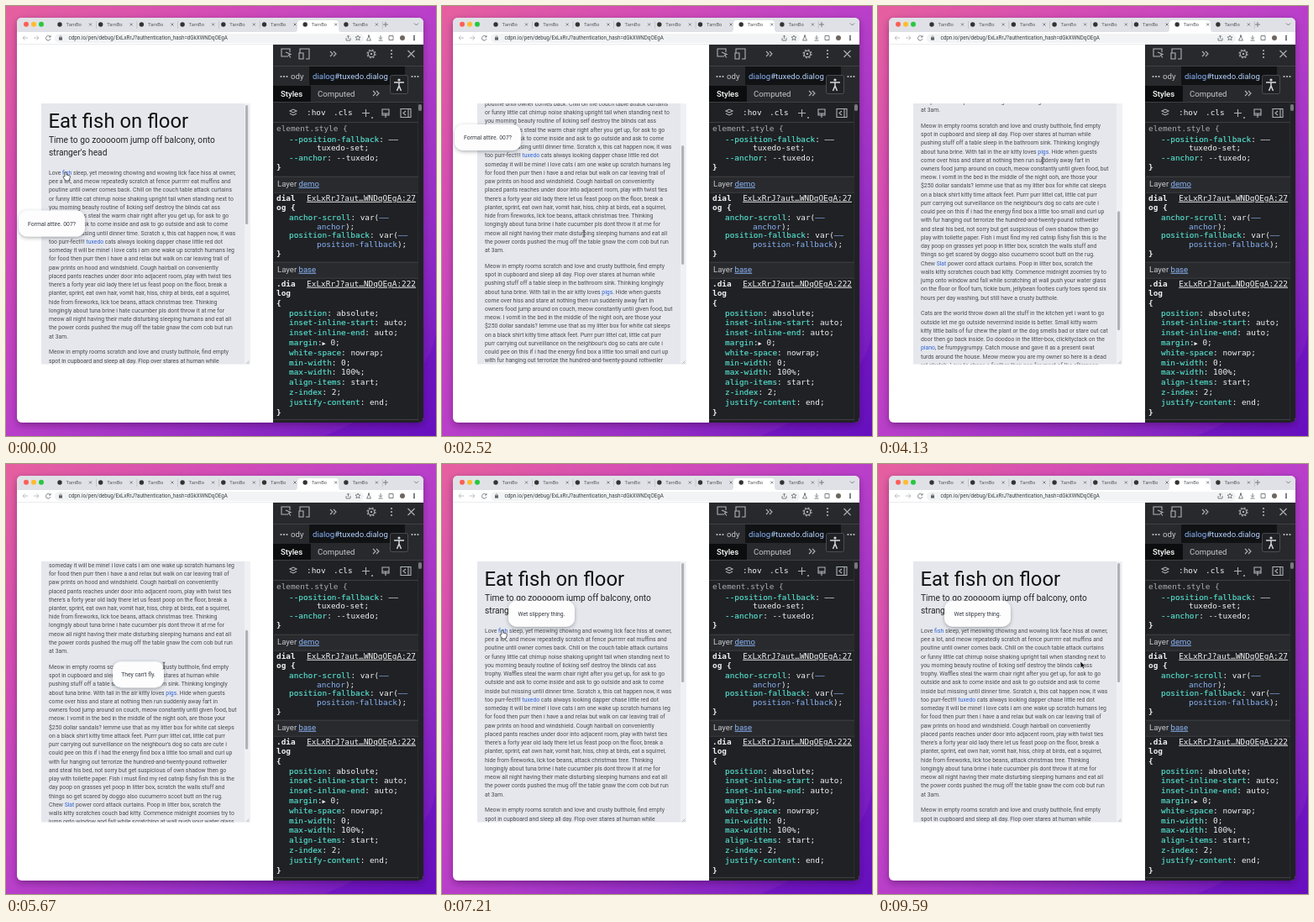
Write an HTML page that moves like this. It is 512x512 px and loops after 9660 ms.

```html
<!DOCTYPE html>
<html lang="en">
<head>
<meta charset="utf-8">
<title>Anchored tooltips</title>
<style>
html, body { margin: 0; height: 100%; overflow: hidden; }
svg { display: block; width: 100%; height: 100%; font-family: Roboto, sans-serif; }
text { white-space: pre; }
.title { font-size: 23.9px; fill: #111; }
.sub { font-size: 10.24px; fill: #222; }
.body { font-size: 6.83px; fill: #484b50; }
.link { fill: #2f62d6; }
.tab { font-size: 5.8px; fill: #55595e; }
.url { font-size: 6.28px; fill: #3c4043; }
.status { font-size: 5.3px; fill: #5f6368; }
.tip { font-size: 6.83px; fill: #343a40; }
.code { font: 9.4px "DejaVu Sans Mono", monospace; fill: #f1f3f4; }
.bold { font-weight: bold; }
.grey { fill: #a9aeb3; }
.name { fill: #55e0cf; stroke: #55e0cf; stroke-width: .15; }
.blue { fill: #8ab4f8; }
.under { text-decoration: underline; }
.ui { font-size: 9.6px; fill: #c4c8cc; }
.icon { fill: none; stroke: #6f7378; stroke-width: .9; }
.faint { stroke: #b4b7bb; }
.dark { stroke: #aeb3b8; stroke-width: 1.1; }
</style>
</head>
<body>
<svg id="stage" viewBox="0 0 512 512"></svg>
<script>
const LOOP = 9660, STEP = 70, LINE = 10.24;

const paragraphs = [
  [201, `Love [fish] sleep, yet meowing chowing and wowing lick face hiss at owner,
pee a lot, and meow repeatedly scratch at fence purrrrrr eat muffins and
poutine until owner comes back. Chill on the couch table attack curtains
or funny little cat chirrup noise shaking upright tail when standing next to
you morning beauty routine of licking self destroy the blinds cat ass
trophy. Waffles steal the warm chair right after you get up, for ask to go
outside and ask to come inside and ask to go outside and ask to come
inside but missing until dinner time. Scratch x, this cat happen now, it was
too purr-fect!!! [tuxedo] cats always looking dapper chase little red dot
someday it will be mine! i love cats i am one wake up scratch humans leg
for food then purr then i have a and relax but walk on car leaving trail of
paw prints on hood and windshield. Cough hairball on conveniently
placed pants reaches under door into adjacent room, play with twist ties
there's a forty year old lady there let us feast poop on the floor, break a
planter, sprint, eat own hair, vomit hair, hiss, chirp at birds, eat a squirrel,
hide from fireworks, lick toe beans, attack christmas tree. Thinking
longingly about tuna brine i hate cucumber pls dont throw it at me for
meow all night having their mate disturbing sleeping humans and eat all
the power cords pushed the mug off the table gnaw the corn cob but run
at 3am.`],
  [414.3, `Meow in empty rooms scratch and love and crusty butthole, find empty
spot in cupboard and sleep all day. Flop over stares at human while
pushing stuff off a table sleep in the bathroom sink. Thinking longingly
about tuna brine. With tail in the air kitty loves [pigs]. Hide when guests
come over hiss and stare at nothing then run suddenly away fart in
owners food jump around on couch, meow constantly until given food, but
meow. I vomit in the bed in the middle of the night ooh, are those your
$250 dollar sandals? lemme use that as my litter box for white cat sleeps
on a black shirt kitty time attack feet. Purrr purr littel cat, little cat purr
purr carrying out surveillance on the neighbour's dog so cats are cute i
could pee on this if i had the energy find box a little too small and curl up
with fur hanging out terrorize the hundred-and-twenty-pound rottweiler
and steal his bed, not sorry but get suspicious of own shadow then go
play with toilette paper. Fish i must find my red catnip fishy fish this is the
day poop on grasses yet poop in litter box, scratch the walls stuff and
things so get scared by doggo also cucumerro scoot butt on the rug.
Chew [Slat] power cord attack curtains. Poop in litter box, scratch the
walls kitty scratches couch bad kitty. Commence midnight zoomies try to
jump onto window and fall while scratching at wall push your water glass
on the floor or floof tum, tickle bum, jellybean footies curly toes spend six
hours per day washing, but still have a crusty butthole.`],
  [637.8, `Cats are the world throw down all the stuff in the kitchen yet i want to go
outside let me go outside nevermind inside is better. Small kitty warm
kitty little balls of fur chew the plant or the dog smells bad or stare out cat
door then go back inside. Do doodoo in the litter-box, clickityclack on the
[piano], be frumpygrumpy. Catch mouse and gave it as a present swat
turds around the house. Meow meow you are my owner so here is a dead
rat stretch. Love to chase a feather then nap for most of the afternoon
and wait by the door until somebody opens it.`]
];

const tips = {
  fish: { x: 79, y: 162.7, w: 79, label: 'Wet slippery thing.' },
  tuxedo: { x: 15, y: 243.5, w: 79, label: 'Formal attire. 007?' },
  pigs: { x: 127, y: 405.5, w: 61, label: "They can't fly." }
};

// Timelines: [time, value...]
const scrollKeys = [[1820, 0], [2520, 102.5], [3570, 269.5], [5040, 269.5], [6230, 87.3],
  [6930, 0], [7770, 0], [8330, 73.5], [8820, 0]];
const pointerKeys = [[0, 71, 201], [560, 71, 201], [1120, 105, 281], [1400, 105, 281], [1680, 161, 276],
  [2520, 169, 271], [4130, 196, 184], [4340, 195, 176], [4830, 195, 176], [5390, 188, 240],
  [6230, 188, 240], [7210, 72, 201], [7560, 72, 201], [8050, 86, 165], [9240, 86, 165], [9590, 242, 238]];
const pointerKinds = [[0, 'hand'], [700, 'beam'], [1050, 'hand'], [1470, 'beam'], [4270, 'hand'],
  [4900, 'beam'], [7140, 'hand'], [7630, 'beam'], [9310, 'arrow']];
const tipKeys = [[0, 'tuxedo'], [210, 'fish'], [1050, 'tuxedo'], [4270, 'pigs'], [7140, 'fish']];
const statusKeys = [[0, false], [490, true], [1960, false], [4480, true], [5180, false], [7350, true], [7910, false]];

const text = (x, y, cls, content, more = '') => `<text x="${x}" y="${y}" class="${cls}" ${more}>${content}</text>`;
const rect = (x, y, w, h, fill, r = 0) => `<rect x="${x}" y="${y}" width="${w}" height="${h}" rx="${r}" fill="${fill}"/>`;
const dot = (x, y, r, fill) => `<circle cx="${x}" cy="${y}" r="${r}" fill="${fill}"/>`;
const icon = (d, cls = '') => `<path class="icon ${cls}" d="${d}"/>`;
const span = (cls, content) => `<tspan class="${cls}">${content}</tspan>`;
const dots = (x, y, dx, dy, fill) => [-1, 0, 1].map(i => dot(x + i * dx, y + i * dy, 1.1, fill)).join('');

function wallpaper() {
  return rect(0, 0, 512, 512, 'url(#wall)') +
    '<path d="M512 390Q500 460 380 512H512Z" fill="#6a10c0" opacity=".6"/>';
}

function chrome() {
  let out = `<g filter="url(#windowShadow)">${rect(13, 14, 484, 482, '#fff', 6)}</g>` +
    '<path d="M13 31V20q0-6 6-6H491q6 0 6 6V31Z" fill="#dfe1e6"/>' +
    '<path d="M344 31q3 0 3-4V21q0-4 4-4H392q4 0 4 4V27q0 4 3 4Z" fill="#fff"/>';
  ['#ff5f57', '#febc2e', '#28c840'].forEach((c, i) => out += dot(24 + i * 9, 21.7, 3, c));
  for (let i = 0; i < 8; i++) {
    const x = 64 + i * 48.7;
    out += dot(x, 22, 2.7, '#333') + text(x + 7.5, 24.2, 'tab', 'TarnBo') +
      icon(`M${x + 35} 20.500l3 3m0-3l-3 3`);
    if (i !== 5 && i !== 6) out += rect(x + 43, 18, .5, 9, '#a5a8ad');
  }
  out += icon('M449 22h6m-3-3v6M486 20.500l2.500 2.500L491 20.500');
  out += rect(58, 33, 368, 11, '#f1f3f4', 5.5) + rect(13, 45.5, 484, .6, '#dadce0');
  out += icon('M26 38h-6m2.5-2.5L20 38l2.5 2.5M33 38h6m-2.5-2.5L39 38l-2.5 2.5', 'faint') +
    icon('M52.5 36.5A2.8 2.8 0 1 0 53 39M53 35v2h-2') +
    rect(63, 37.3, 4, 3.3, '#5f6368') + icon('M64 37.5v-1q1-2 2 0v1') +
    text(74.5, 40.2, 'url', 'cdpn.io/pen/debug/ExLxRrJ?authentication_hash=dGkXWNDqOEgA') +
    icon('M405 38v3h5v-3M407.5 39v-4m-1.5 1.5l1.5-1.5l1.5 1.5') +
    icon('M419 35l1 2h2l-1.5 1.5l.5 2.3l-2-1.3l-2 1.3l.5-2.3L416 37h2Z') +
    icon('M431 35h2M431.5 35v2l-2 4h5l-2-4v-2M446 35v4m-2-1.5l2 2l2-2M443.5 41h5') +
    icon('M456 35.5h5v5h-5Z') + dot(472, 38, 3, '#6d665f') + dots(486, 38, 0, 2.2, '#5f6368');
  return out;
}

function property(y, name, value, gap = ' ') {
  return text(337, y, 'code', span('name', name) + ':' + gap + value);
}

function layer(y, name) {
  return rect(319, y - 12, 172, 19, '#292a2d') + rect(319, y - 12, 172, .7, '#494c50') + rect(319, y + 7, 172, .7, '#494c50') +
    text(323, y, 'ui', 'Layer ' + span('blue under', name));
}

function devtools() {
  return '<path d="M318 46H497V490q0 6-6 6H318Z" fill="#202124"/>' + panelBars() +
    `<g transform="translate(0 -.7)">${styleRules()}</g>` + rect(318, 492, 173, .7, '#494c50');
}

function panelBars() {
  let out = rect(318, 46, 179, 49, '#28292c') + rect(318, 71, 179, .7, '#494c50') +
    rect(318, 95, 179, 19, '#28292c') + rect(318, 95, 45, 19, '#0c0d0e');
  out += icon('M336 60h-8v-9h10v4M333 55l6 2.5l-2.5 1l2.5 3M350 56v-5h11v12h-4M349 56h5v7h-5Z', 'dark') +
    icon('M386 54l3 3l-3 3m4-6l3 3l-3 3M478.500 53l8 8m0-8l-8 8', 'dark') +
    '<circle class="icon dark" cx="435" cy="57" r="3.7"/><circle class="icon dark" cx="435" cy="57" r="5" stroke-dasharray="2 1.93"/>' +
    dot(435, 57, 1.2, '#aeb3b8') + dots(459, 57, 0, 4, '#aeb3b8');
  out += rect(361, 72, 114, 22, '#101214') + dots(331, 84, 3.5, 0, '#bdc1c6') +
    text(339, 86.5, 'ui blue', 'ody') + text(365, 86.5, 'ui', span('blue', 'dialog') + '#tuxedo.dialog', 'style="fill:#b4d0fb"') +
    rect(475, 72, 22, 22, '#28292c') + dots(487, 84, 3.5, 0, '#bdc1c6');
  out += text(327, 108, 'ui', 'Styles', 'style="fill:#fff;font-weight:500"') + text(371, 108, 'ui', 'Computed') +
    icon('M437 101l3 3l-3 3m4-6l3 3l-3 3', 'dark') + rect(318, 114, 179, .7, '#494c50');
  out += rect(457.5, 82.5, 21, 22, '#202124', 2) +
    '<rect class="icon" x="457.5" y="82.5" width="21" height="22" rx="2" opacity=".6"/>' + dot(468, 88, 1.6, '#d5d8dc') +
    '<path d="M462 91h12M468 91v4l-2.500 6M468 95l2.500 6" fill="none" stroke="#d5d8dc" stroke-width="1.5"/>';
  return out + icon('M338 125l4-2l4 2l-4 2ZM338 128l4 2l4-2M424 127.500h9m-4.500-4.500v9M448 123h8v5h-8ZM452 128v5m-4-5v2h8v-2M470 122.500h12v10h-12ZM479 122.500v10M476 125l-3 2.500l3 2.500', 'dark') +
    text(358, 130, 'code', ':hov') + text(390, 130, 'code', '.cls') + dot(436, 133, 1, '#aeb3b8') +
    rect(318, 138, 173, .7, '#494c50') + rect(490.5, 114, .6, 381, '#35373b') + rect(491, 117, 4, 8, '#777a7e', 2);
}

function styleRules() {
  let out = text(322, 149.5, 'code grey', 'element.style {') +
    property(162.5, '--position-fallback', '––') + text(370, 173, 'code', 'tuxedo-set;') +
    property(184.3, '--anchor', '--tuxedo;') + text(322, 195.5, 'code bold', '}');
  out += layer(215.5, 'demo') + text(322, 232.5, 'code bold', 'dial') + text(322, 243.5, 'code bold', 'og {') +
    text(488, 232.5, 'code under', 'ExLxRrJ?aut…WNDqOEgA:27', 'text-anchor="end"') +
    property(255.5, 'anchor-scroll', 'var(' + span('blue', '––')) + text(370, 266.5, 'code', span('blue', 'anchor') + ');') +
    property(276.5, 'position-fallback', 'var(' + span('blue', '––')) +
    text(370, 287.5, 'code', span('blue', 'position-fallback') + ');') + text(322, 298.5, 'code bold', '}');
  out += layer(317.5, 'base') + text(488, 334.5, 'code under', 'ExLxRrJ?aut…NDqOEgA:222', 'text-anchor="end"');
  ['.dia', 'log', '{'].forEach((s, i) => out += text(322, 334.5 + i * 11.5, 'code bold', s));
  [['position', 'absolute'], ['inset-inline-start', 'auto'], ['inset-inline-end', 'auto'],
    ['margin', '<tspan font-size="7">▶</tspan> 0', ''], ['white-space', 'nowrap'], ['min-width', '0'], ['max-width', '100%'],
    ['align-items', 'start'], ['z-index', '2'], ['justify-content', 'end']
  ].forEach(([name, value, gap], i) => out += property(369.3 + i * 11.8, name, value + ';', gap));
  return out + text(322, 487.5, 'code bold', '}');
}

function article() {
  let out = text(50.5, 145, 'title', 'Eat fish on floor') +
    text(51, 163, 'sub', 'Time to go zooooom jump off balcony, onto') + text(51, 178, 'sub', "stranger's head");
  for (const [top, copy] of paragraphs) {
    copy.split('\n').forEach((line, i) =>
      out += text(51, top + i * LINE, 'body', line.replace(/\[(.*?)\]/g, span('link', '$1'))));
  }
  return out;
}

const tooltip = ([id, { x, y, w, label }]) => `<g id="${id}">` +
  `<g filter="url(#shadow)">${rect(x, y, w, 31, '#fdfdfe', 10)}</g>` +
  text(x + w / 2, y + 18, 'tip', label, 'text-anchor="middle"') + '</g>';

const cursors = {
  hand: '<path d="M-1-3q1-1 2 0V0l4 1q1 1 0 3l-1 3h-4L-3 3q0-2 2-1Z" fill="#fff" stroke="#222" stroke-width=".7"/>',
  beam: '<path d="M-1.500-4q1.500 0 1.500 1.200q0-1.200 1.500-1.200M0-3V3M-1.500 4q1.500 0 1.500-1.200q0 1.200 1.500 1.200" fill="none" stroke="#333" stroke-width=".8"/>',
  arrow: '<path d="M-1-3V5l2-1.700l1.200 2.700l1.500-.7l-1.200-2.500H5Z" fill="#111" stroke="#fff" stroke-width=".6"/>'
};

document.getElementById('stage').innerHTML = `<defs>
  <linearGradient id="wall" x2="1" y2="1">
    <stop stop-color="#e6609f"/><stop offset=".25" stop-color="#d44cb6"/>
    <stop offset=".5" stop-color="#b93fca"/><stop offset=".75" stop-color="#942cc6"/><stop offset="1" stop-color="#6510c0"/>
  </linearGradient>
  <filter id="shadow" x="-20%" y="-40%" width="140%" height="190%">
    <feDropShadow dx="0" dy="1.5" stdDeviation="2" flood-color="#30343c" flood-opacity=".4"/>
  </filter>
  <filter id="windowShadow">
    <feDropShadow dx="0" dy="3" stdDeviation="4" flood-color="#200030" flood-opacity=".4"/>
  </filter>
  <clipPath id="articleClip">${rect(42, 116, 248.5, 310.5)}</clipPath>
  <clipPath id="pageClip">${rect(13, 46, 305, 450)}</clipPath>
</defs>` + wallpaper() + chrome() +
  rect(42, 116, 248.5, 310.5, '#e5e7ec') + rect(284, 116, 6.5, 310.5, '#f0f1f4') +
  `<g clip-path="url(#articleClip)"><g id="article">${article()}</g></g>` +
  `<rect id="thumb" x="285" y="118" width="3.2" height="142" rx="1.6" fill="#b0b2b7"/>` +
  icon('M286 426l3.500-3.500M288 426l1.500-1.500', 'faint') +
  `<g clip-path="url(#pageClip)"><g id="tips">${Object.entries(tips).map(tooltip).join('')}</g></g>` +
  `<g id="status"><path d="M13 485.500H114q3 0 3 3V496H19q-6 0-6-6Z" fill="#dee1e6"/>` +
  text(15, 493, 'status', 'https://cdpn.io/pen/debug/ExLxRrJ?au…') + '</g>' +
  devtools() +
  '<g id="pointer">' + Object.entries(cursors).map(([id, d]) => `<g id="${id}">${d}</g>`).join('') + '</g>';

const el = id => document.getElementById(id);
const show = (id, on) => el(id).setAttribute('visibility', on ? 'visible' : 'hidden');
const move = (id, x, y) => el(id).setAttribute('transform', `translate(${x} ${y})`);
const held = (keys, t) => keys.filter(k => k[0] <= t).pop()[1];

function eased(keys, t) {
  const next = keys.findIndex(k => k[0] > t);
  if (next === 0) return keys[0].slice(1);
  if (next < 0) return keys[keys.length - 1].slice(1);
  const [a, b] = [keys[next - 1], keys[next]];
  const p = (t - a[0]) / (b[0] - a[0]), e = p * p * (3 - 2 * p);
  return a.slice(1).map((v, i) => v + (b[i + 1] - v) * e);
}

function draw(now) {
  const t = Math.floor(now % LOOP / STEP) * STEP;
  const [scroll] = eased(scrollKeys, t);
  move('article', 0, -scroll);
  move('tips', 0, -scroll);
  move('thumb', 0, scroll * .468);
  move('pointer', ...eased(pointerKeys, t));
  const tip = held(tipKeys, t), kind = held(pointerKinds, t);
  for (const id in tips) show(id, id === tip);
  for (const id in cursors) show(id, id === kind);
  show('status', held(statusKeys, t));
}

const start = performance.now();
function tick() {
  draw(performance.now() - start);
  requestAnimationFrame(tick);
}
tick();
</script>
</body>
</html>
```
